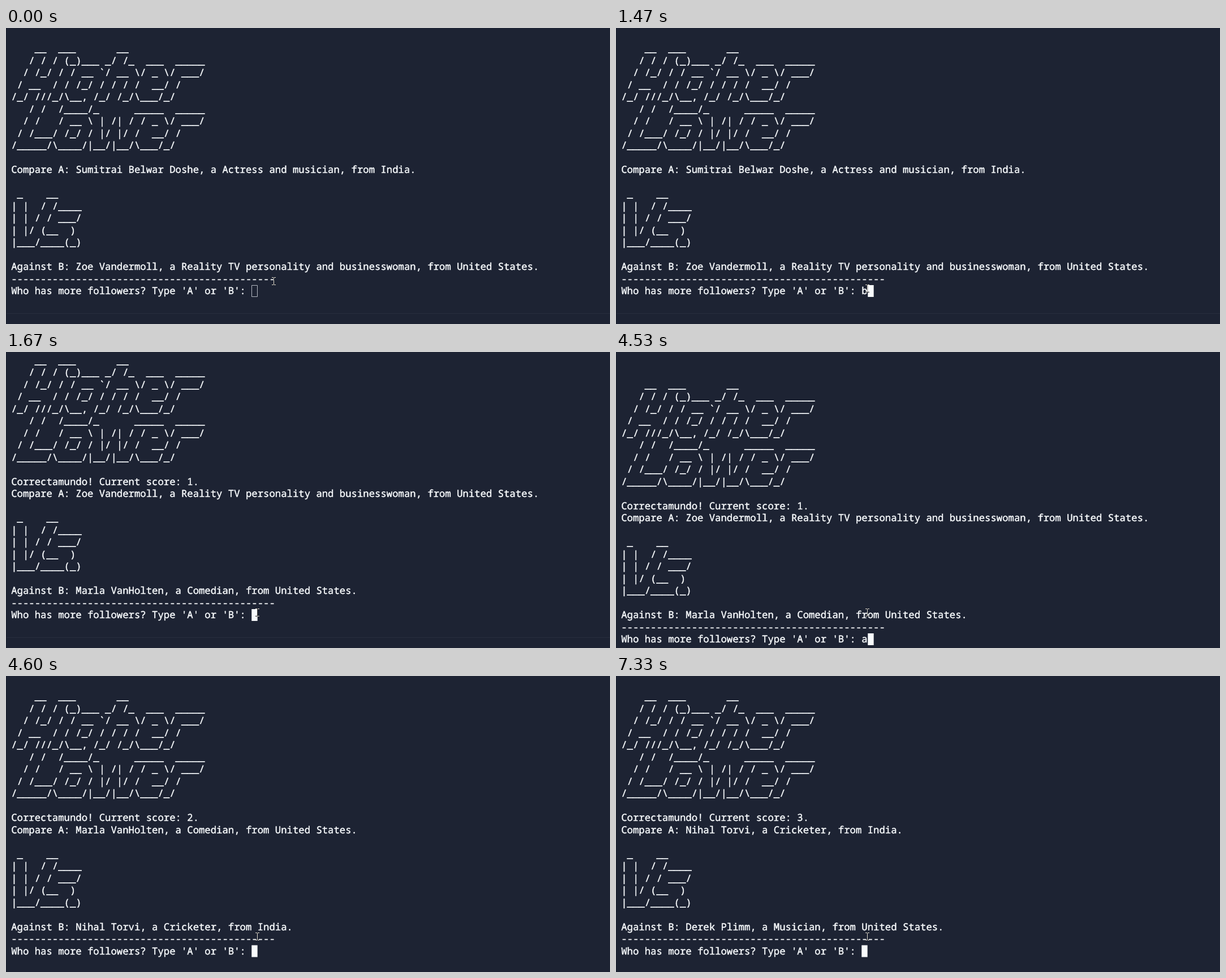
These frames come from a looping animation (1068 px wide and 525 px high, 8 s). An HTML page with a canvas:

```html
<!DOCTYPE html>
<html lang="en">
<head>
<meta charset="utf-8">
<title>Higher Lower</title>
<style>
  html, body { margin: 0; width: 100%; height: 100%; overflow: hidden; background: #1d2333; }
  canvas { display: block; }
</style>
</head>
<body>
<canvas id="stage" width="1068" height="525"></canvas>
<script>
const ctx = document.getElementById('stage').getContext('2d');
const LOOP = 8000;
const LEFT = 9.2, FONT_SIZE = 17.3, CELL_W = FONT_SIZE * 0.6, CELL_H = 21.5;
const BACKGROUND = '#1d2333', TEXT = '#f8fbfd';

const TITLE = String.raw`
    __  ___       __
   / / / (_)___ _/ /_  ___  _____
  / /_/ / / __ ${'`'}/ __ \/ _ \/ ___/
 / __  / / /_/ / / / /  __/ /
/_/ ///_/\__, /_/ /_/\___/_/
   / /  /____/_      _____  _____
  / /   / __ \ | /| / / _ \/ ___/
 / /___/ /_/ / |/ |/ /  __/ /
/_____/\____/|__/|__/\___/_/
`.slice(1).split('\n');

const VERSUS = String.raw`
 _    __
| |  / /____
| | / / ___/
| |/ (__  )
|___/____(_)
`.slice(1).split('\n');

const PROMPT = "Who has more followers? Type 'A' or 'B': ";

const PEOPLE = [
  'Sumitrai Belwar Doshe, a Actress and musician, from India.',
  'Zoe Vandermoll, a Reality TV personality and businesswoman, from United States.',
  'Marla VanHolten, a Comedian, from United States.',
  'Nihal Torvi, a Cricketer, from India.',
  'Derek Plimm, a Musician, from United States.'
];

// Each state holds from its start time until the next one begins.
const STATES = [
  { at: 0, score: 0, typed: '', baseline: 472, hollow: true, divider: true },
  { at: 730, score: 0, typed: '', baseline: 472, divider: true },
  { at: 1470, score: 0, typed: 'b', baseline: 472, divider: true },
  { at: 1670, score: 1, typed: '', baseline: 472, divider: true },
  { at: 1730, score: 1, typed: '', baseline: 515 },
  { at: 4530, score: 1, typed: 'a', baseline: 515 },
  { at: 4600, score: 2, typed: '', baseline: 493.5 },
  { at: 7270, score: 2, typed: 'b', baseline: 493.5 },
  { at: 7330, score: 3, typed: '', baseline: 493.5 }
];

function screenLines({ score, typed }) {
  return [
    ...TITLE,
    ...(score ? [`Correctamundo! Current score: ${score}.`] : []),
    `Compare A: ${PEOPLE[score]}`,
    '',
    ...VERSUS,
    `Against B: ${PEOPLE[score + 1]}`,
    '-'.repeat(45),
    PROMPT + typed
  ];
}

function drawLines(lines, lastBaseline) {
  ctx.font = `${FONT_SIZE}px "Noto Sans Mono", "DejaVu Sans Mono", monospace`;
  ctx.textRendering = 'geometricPrecision';
  ctx.fillStyle = ctx.strokeStyle = TEXT;
  ctx.lineWidth = 0.45;
  ctx.lineJoin = 'round';
  lines.forEach((line, i) => {
    const y = lastBaseline - (lines.length - 1 - i) * CELL_H;
    ctx.fillText(line, LEFT, y);
    ctx.strokeText(line, LEFT, y); // thickens the strokes to a medium weight
  });
}

function drawCaret({ typed, baseline, hollow }) {
  const x = Math.floor(LEFT + (PROMPT.length + typed.length) * CELL_W);
  const y = baseline - 16;
  if (hollow) {
    ctx.strokeStyle = '#b4b9c2';
    ctx.lineWidth = 1;
    ctx.strokeRect(x + 0.5, y + 0.5, 10, 20);
  } else {
    ctx.fillStyle = TEXT;
    ctx.fillRect(x + 0.3, y, CELL_W, 21);
  }
}

// The I-beam inverts whatever lies beneath it.
function drawPointer(time) {
  const step = Math.max(0, Math.min(7, Math.floor((time - 70) / 76.6) + 1));
  const eased = 1 - (1 - step / 7) ** 2;
  const x = Math.round(473 - 29 * eased);
  const y = Math.round(442 + 13 * eased);
  ctx.save();
  ctx.globalCompositeOperation = 'difference';
  ctx.fillStyle = '#fff';
  ctx.fillRect(x, y + 1, 1, 12);
  for (const edge of [y, y + 13]) {
    ctx.fillRect(x - 3, edge, 3, 1);
    ctx.fillRect(x + 1, edge, 3, 1);
  }
  ctx.restore();
}

function draw(time) {
  const state = STATES.findLast(s => time >= s.at);
  ctx.fillStyle = BACKGROUND;
  ctx.fillRect(0, 0, 1068, 525);
  ctx.fillStyle = '#161b29';
  ctx.fillRect(0, 0, 1, 525);
  if (state.divider) {
    ctx.fillStyle = '#272d3d';
    ctx.fillRect(1, 506, 1067, 1);
  }
  drawLines(screenLines(state), state.baseline);
  drawCaret(state);
  drawPointer(time);
}

const start = performance.now();
function frame() {
  draw((performance.now() - start) % LOOP);
  requestAnimationFrame(frame);
}
frame();
</script>
</body>
</html>
```
